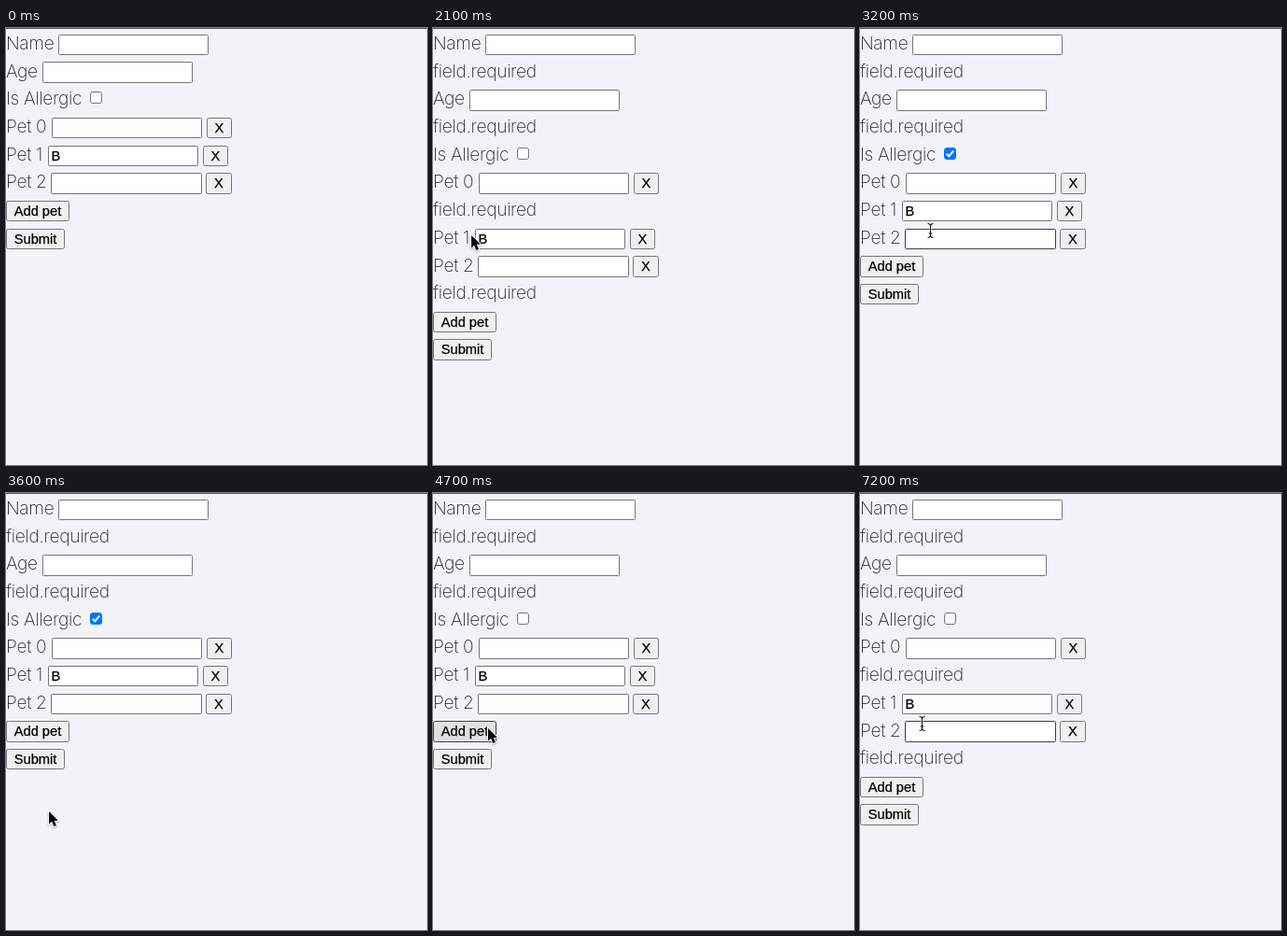
Animation of 451 by 468 pixels, one loop 7.4 s. Source, as an HTML page with a canvas:

```html
<!DOCTYPE html>
<html lang="en">
<head>
<meta charset="utf-8">
<title>Pet form</title>
<style>
  html, body { margin: 0; width: 100%; height: 100%; overflow: hidden; background: #f2f3f7; }
  canvas { display: block; width: 451px; height: 468px; }
</style>
</head>
<body>
<canvas id="stage"></canvas>
<script>
const W = 451, H = 468, LOOP = 7400, STEP = 100;
const ROW = 29.7, TOP = 6.75, BASE = 22.9;
const BOX_H = 22.4, INPUT_W = 161.4, REMOVE_W = 27.4, CHECK = 13;
const LABEL_FONT = '200 19.2px Inter, "Open Sans", sans-serif';
const CONTROL_FONT = '14.67px "Liberation Sans", Arial, sans-serif';
const EDGE = '#767676', EDGE_OVER = '#404040';

const canvas = document.getElementById('stage');
const dpr = window.devicePixelRatio || 1;
canvas.width = W * dpr;
canvas.height = H * dpr;
const ctx = canvas.getContext('2d');
ctx.scale(dpr, dpr);

const smooth = k => k * k * (3 - 2 * k);
const linear = k => k;

// Pointer path: time, x, y, easing towards this point
const path = [
  [300, 384, 433],
  [400, 384, 433],
  [1200, 38, 227, smooth],
  [2000, 38, 227],
  [2700, 93.5, 135, smooth],
  [2900, 93.5, 136],
  [3600, 46, 341, smooth],
  [3700, 46, 341],
  [4100, 94, 137, smooth],
  [4300, 94, 140],
  [4500, 80, 196],
  [4700, 59, 252],
  [5200, 54, 282, smooth],
  [7000, 54, 282],
  [7200, 66, 247]
];

function pointerAt(t) {
  if (t < path[0][0]) return null;
  const i = path.findIndex(p => p[0] > t);
  if (i < 0) {
    const [, x, y] = path[path.length - 1];
    return { x, y };
  }
  const [t0, x0, y0] = path[i - 1];
  const [t1, x1, y1, ease = linear] = path[i];
  const k = ease((t - t0) / (t1 - t0));
  return { x: x0 + (x1 - x0) * k, y: y0 + (y1 - y0) * k };
}

function stateAt(t) {
  return {
    errors: t >= 1600,
    petErrors: (t >= 1600 && t < 2900) || t >= 5600,
    checked: t >= 2900 && t < 4200,
    pressed: (t >= 1500 && t < 1600) || (t >= 5500 && t < 5600)
  };
}

function rowsFor(s) {
  const error = { kind: 'error' };
  const pet = (n, x, value) => ({ kind: 'input', label: 'Pet ' + n, x, value, remove: true });
  return [
    { kind: 'input', label: 'Name', x: 56 },
    s.errors && error,
    { kind: 'input', label: 'Age', x: 39 },
    s.errors && error,
    { kind: 'check', label: 'Is Allergic', x: 90 },
    pet(0, 49),
    s.petErrors && error,
    pet(1, 45, 'B'),
    pet(2, 48.3),
    s.petErrors && error,
    { kind: 'button', label: 'Add pet', w: 68 },
    { kind: 'button', label: 'Submit', w: 63 }
  ].filter(Boolean);
}

const inside = (p, x, y, w, h) =>
  !!p && p.x >= x && p.x <= x + w && p.y >= y && p.y <= y + h;

// Bordered box with all four edges snapped to whole pixels
function box(x, y, w, h, r, fill, stroke) {
  const left = Math.round(x), top = Math.round(y);
  const right = Math.round(x + w), bottom = Math.round(y + h);
  ctx.beginPath();
  ctx.roundRect(left + 0.5, top + 0.5, right - left - 1, bottom - top - 1, r);
  ctx.fillStyle = fill;
  ctx.fill();
  ctx.strokeStyle = stroke;
  ctx.lineWidth = 1;
  ctx.stroke();
}

function label(str, y) {
  ctx.font = LABEL_FONT;
  ctx.letterSpacing = '-0.32px';
  ctx.fillStyle = '#212529';
  ctx.fillText(str, 0, Math.round(y));
}

function control(str, x, y) {
  ctx.font = CONTROL_FONT;
  ctx.letterSpacing = '0px';
  ctx.fillStyle = ctx.strokeStyle = '#000';
  ctx.lineWidth = 0.25;
  ctx.fillText(str, x, Math.round(y));
  ctx.strokeText(str, x, Math.round(y));
}

function button(str, x, y, w, p, pressed) {
  const over = inside(p, x, y, w, BOX_H);
  const fill = !over ? '#efefef' : pressed ? '#f5f5f5' : '#e1e1e1';
  box(x, y, w, BOX_H, 2, fill, over && !pressed ? EDGE_OVER : EDGE);
  control(str, x + 8.7, y + 16);
}

function checkbox(x, y, p, checked) {
  if (!checked) {
    const over = inside(p, x, y, CHECK, CHECK);
    return box(x, y, CHECK, CHECK, 2.5, '#fff', over ? EDGE_OVER : EDGE);
  }
  box(x, y, CHECK, CHECK, 2.5, '#0075ff', '#0075ff');
  ctx.beginPath();
  ctx.moveTo(x + 2.8, y + 6.7);
  ctx.lineTo(x + 5.3, y + 9.3);
  ctx.lineTo(x + 10.2, y + 3.7);
  ctx.strokeStyle = '#fff';
  ctx.lineWidth = 2;
  ctx.stroke();
}

function arrow({ x, y }) {
  ctx.save();
  ctx.translate(x, y);
  ctx.beginPath();
  [[0, 0], [0, 13.6], [3.1, 10.8], [5.3, 16], [7.9, 14.9], [5.7, 9.9], [9.8, 9.7]]
    .forEach(([px, py]) => ctx.lineTo(px, py));
  ctx.closePath();
  ctx.lineJoin = 'round';
  ctx.strokeStyle = '#fff';
  ctx.lineWidth = 2;
  ctx.shadowColor = 'rgba(0,0,0,.3)';
  ctx.shadowBlur = 2 * dpr;
  ctx.shadowOffsetY = dpr;
  ctx.stroke();
  ctx.shadowColor = 'transparent';
  ctx.fillStyle = '#000';
  ctx.fill();
  ctx.restore();
}

function beam({ x, y }) {
  ctx.save();
  ctx.translate(Math.round(x) + 0.5, Math.round(y));
  ctx.beginPath();
  for (const s of [-1, 1]) {
    ctx.moveTo(-3, 7.5 * s);
    ctx.quadraticCurveTo(0, 7.5 * s, 0, 5 * s);
    ctx.quadraticCurveTo(0, 7.5 * s, 3, 7.5 * s);
  }
  ctx.moveTo(0, -6);
  ctx.lineTo(0, 6);
  ctx.moveTo(-2, 3);
  ctx.lineTo(2, 3);
  for (const [color, width] of [['rgba(255,255,255,.8)', 2.4], ['#111', 1.1]]) {
    ctx.strokeStyle = color;
    ctx.lineWidth = width;
    ctx.stroke();
  }
  ctx.restore();
}

function draw(t) {
  const s = stateAt(t), p = pointerAt(t);
  let overText = false;

  ctx.fillStyle = '#f2f3f7';
  ctx.fillRect(0, 0, W, H);
  ctx.fillStyle = '#56575c';
  ctx.fillRect(0, 0, W, 1);

  rowsFor(s).forEach((row, i) => {
    const y = TOP + ROW * i, base = BASE + ROW * i;
    if (row.kind === 'button') return button(row.label, 0, y, row.w, p, s.pressed);
    if (row.kind === 'error') {
      label('field.required', base);
      overText ||= inside(p, 0, y, 112, BOX_H);
      return;
    }
    label(row.label, base);
    if (row.kind === 'check') return checkbox(row.x, Math.round(y + 2), p, s.checked);

    const over = inside(p, row.x, y, INPUT_W, BOX_H);
    overText ||= over;
    box(row.x, y, INPUT_W, BOX_H, 1, '#fff', over ? EDGE_OVER : EDGE);
    if (row.value) control(row.value, row.x + 3.5, y + 16);
    if (row.remove) button('X', row.x + INPUT_W + 4.5, y, REMOVE_W, p, false);
  });

  if (p) (overText ? beam : arrow)(p);
}

function tick() {
  const t = performance.now() % LOOP;
  draw(Math.floor(t / STEP) * STEP);
  requestAnimationFrame(tick);
}
tick();
</script>
</body>
</html>
```
